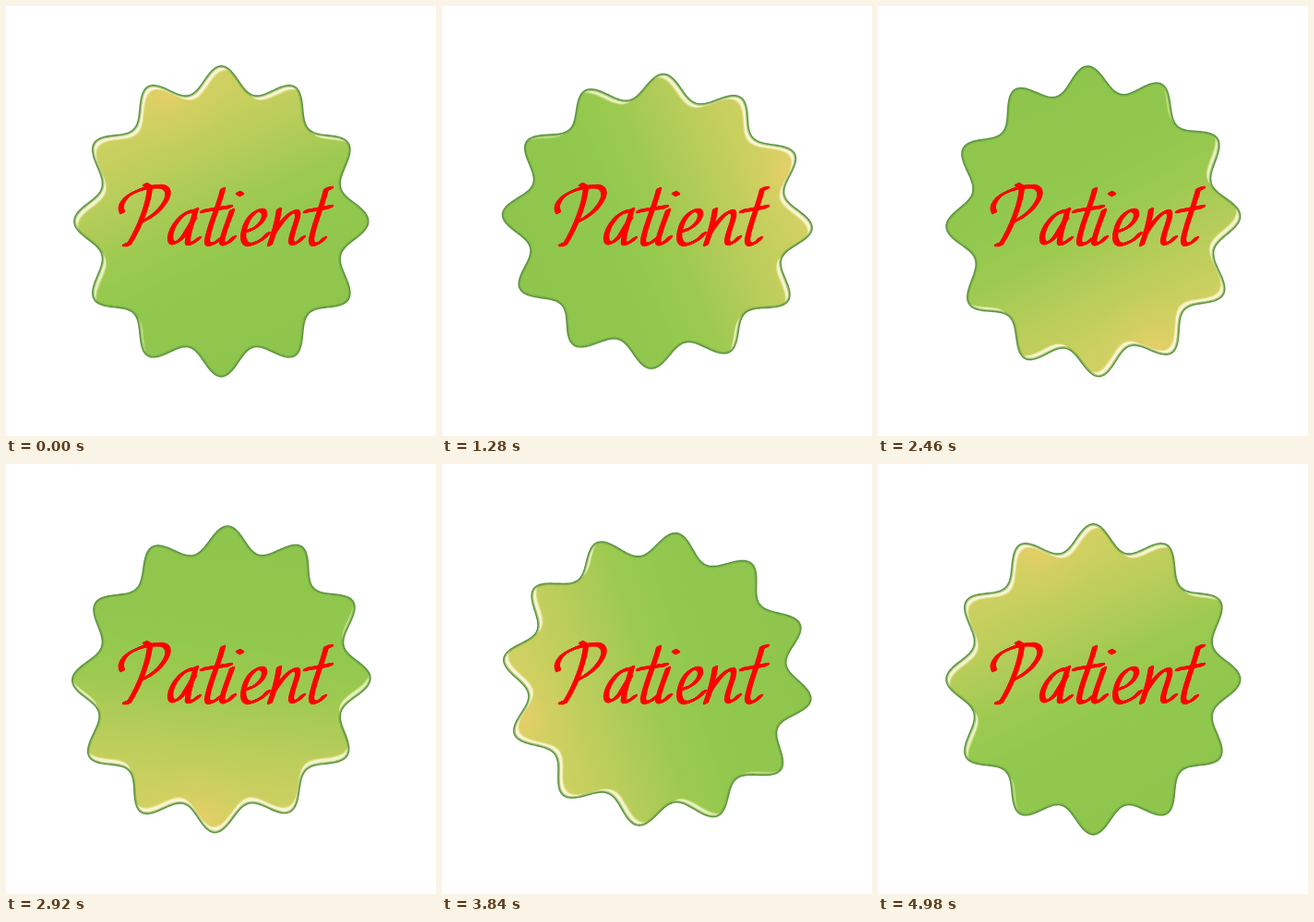
Recreate the animation shown at these times as an HTML page with a canvas. Size 466 px wide and 465 px high, loop 5 s.

```html
<!DOCTYPE html>
<html lang="en">
<head>
<meta charset="utf-8">
<title>Patient</title>
<style>
html, body { margin: 0; width: 100%; height: 100%; overflow: hidden; background: #fff; }
canvas { display: block; width: 466px; height: 465px; }
</style>
</head>
<body>
<canvas id="stage" width="466" height="465" role="img" aria-label="Patient">Patient</canvas>
<script>
const ctx = document.getElementById('stage').getContext('2d');
const LOOP = 5000, STEP = 20, LAST = LOOP / STEP - 1;
const CX = 233.3, CY = 232.8;

// Twelve soft points on a slightly tall ellipse
function badgePath() {
  const p = new Path2D();
  for (let i = 0; i < 720; i++) {
    const a = i * Math.PI / 360;
    const r = 0.915 + 0.08 * Math.cos(12 * a) + 0.005 * Math.cos(24 * a);
    p.lineTo(159.5 * r * Math.sin(a), -168 * r * Math.cos(a));
  }
  p.closePath();
  return p;
}

// Everything outside the badge after shifting it
function rimPath(dx, dy) {
  const p = new Path2D();
  p.rect(-240, -240, 480, 480);
  p.addPath(badge, new DOMMatrix([1, 0, 0, 1, dx, dy]));
  return p;
}

function ramp(g, stops) {
  for (const [at, color] of stops) g.addColorStop(at, color);
  return g;
}

// Gradient along the direction of the light
function lit(stops) {
  return ramp(ctx.createLinearGradient(-70, -150, 70, 150), stops);
}

const badge = badgePath();
const wideRim = rimPath(4.8, 5.2);
const thinRim = rimPath(3.8, 4.2);

const body = lit([
  [0, '#d6d264'], [0.18, '#c6cf5e'], [0.34, '#b1cc58'],
  [0.475, '#9dca50'], [0.62, '#92c84e'], [1, '#8ec54c']
]);
const glow = ramp(ctx.createRadialGradient(-58, -138, 4, -58, -138, 60), [
  [0, 'rgba(244,204,104,.5)'], [0.4, 'rgba(236,206,104,.22)'], [1, 'rgba(224,208,104,0)']
]);
const warm = lit([
  [0, 'rgba(236,226,140,.8)'], [0.45, 'rgba(214,226,130,.6)'], [1, 'rgba(180,212,100,.1)']
]);
const shine = lit([
  [0, 'rgba(252,244,214,1)'], [0.5, 'rgba(240,246,208,.85)'], [1, 'rgba(220,236,160,.15)']
]);

const letters = [
  // P
  'M126 223 C122 216 128 206 140 201 C150 196 160 195 167 195 C177 196 178 204 171 214 C166 222 158 228 148 233',
  'M151 193 L156 196 C155 210 147 236 133 258 L129 258',
  // a
  'M203 222 C192 221 179 238 178 250 C178 260 186 257 193 248 L204 230',
  'M206 220 C202 234 196 248 197 256 C199 259 205 255 209 251',
  // t
  'M235 198 C231 216 219 240 218 254 C218 261 227 257 233 251',
  'M213 222 C222 220 232 219 243 217',
  // i
  'M245 221 C241 233 235 246 234 255 C235 260 242 256 247 250',
  'M252 202 L255 204',
  // e
  'M262 243 C271 241 281 232 280 224 C278 217 266 222 260 236 C254 252 258 261 268 257 C275 255 280 251 284 246',
  // n
  'M296 220 C294 234 290 247 286 258',
  'M289 248 C298 233 308 222 314 222 C321 224 309 244 309 254 C310 260 317 256 322 250',
  // t
  'M352 197 L347 198 C343 216 332 240 331 253 C331 261 339 258 345 251',
  'M325 222 C334 220 343 219 352 217'
].map(d => new Path2D(d));

function drawBadge(angle) {
  ctx.save();
  ctx.translate(CX, CY);
  ctx.rotate(angle);
  ctx.save();
  ctx.clip(badge);
  for (const fill of [body, glow]) {
    ctx.fillStyle = fill;
    ctx.fillRect(-200, -200, 400, 400);
  }
  ctx.fillStyle = warm;
  ctx.fill(wideRim, 'evenodd');
  ctx.fillStyle = shine;
  ctx.fill(thinRim, 'evenodd');
  ctx.strokeStyle = 'rgba(112,164,68,.6)';
  ctx.lineWidth = 4;
  ctx.stroke(badge);
  ctx.restore();
  ctx.strokeStyle = '#5b9440';
  ctx.lineWidth = 1.4;
  ctx.stroke(badge);
  ctx.restore();
}

// Slanted broad nib: the same stroke swept along a short line
function drawWord() {
  ctx.strokeStyle = '#f00';
  ctx.lineWidth = 2.4;
  ctx.lineCap = ctx.lineJoin = 'round';
  for (let k = -1; k <= 1; k += 0.25) {
    ctx.save();
    ctx.translate(2 * k, -k);
    for (const stroke of letters) ctx.stroke(stroke);
    ctx.restore();
  }
}

function draw(now) {
  const step = Math.floor((now % LOOP) / STEP);
  ctx.fillStyle = '#fff';
  ctx.fillRect(0, 0, 466, 465);
  drawBadge(2 * Math.PI * step / LAST);
  drawWord();
}

const start = performance.now();
function tick() {
  draw(performance.now() - start);
  requestAnimationFrame(tick);
}
tick();
</script>
</body>
</html>
```
